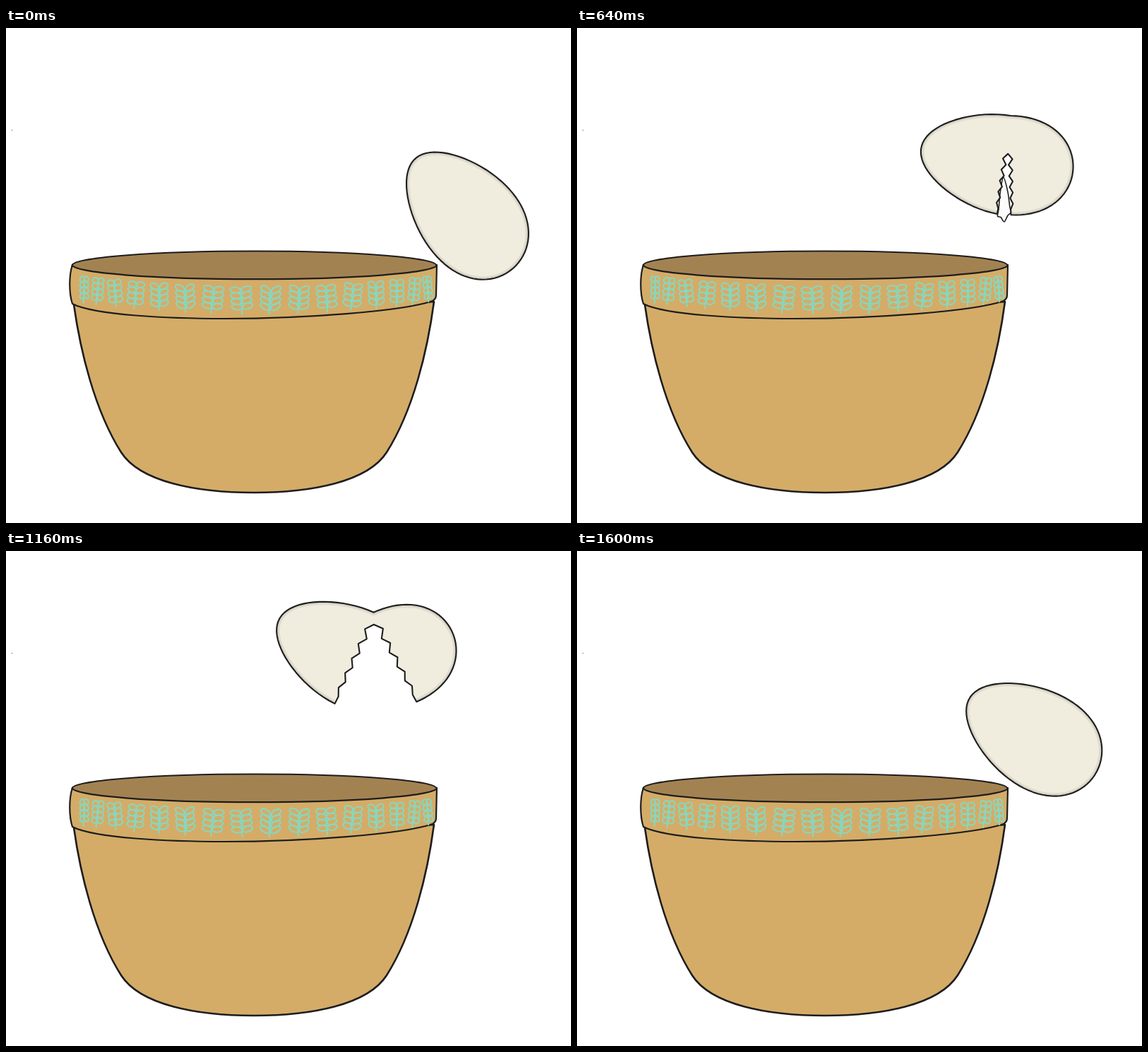
These frames come from a looping animation (800 px wide and 700 px high, 1.64 s). An HTML page with a canvas:

```html
<!DOCTYPE html>
<html lang="en">
<head>
<meta charset="utf-8">
<title>Cracking an egg into a bowl</title>
<style>
  html, body { margin: 0; height: 100%; overflow: hidden; background: #fff; }
  canvas { display: block; }
</style>
</head>
<body>
<canvas id="stage" width="800" height="700"></canvas>
<script>
const ctx = document.getElementById('stage').getContext('2d');
const LOOP = 1640, INK = '#1d1d1d', RAD = Math.PI / 180;

const clamp = v => Math.min(1, Math.max(0, v));
const lerp = (a, b, k) => a + (b - a) * k;
const mix = (a, b, k) => a.map((v, i) => lerp(v, b[i], k));

// Motion of the shell: time, hinge x and y, tilt and half opening in degrees.
const KEYS = [
  [0, 708, 223, 48, 0],
  [120, 733, 213, 55, 0],
  [360, 679, 212, 31, 0],
  [520, 654, 160, 20, 1.5],
  [640, 614, 124, 8, 4],
  [800, 535, 85, .5, 19],
  [960, 511, 67, 2, 25.5],
  [1040, 501, 82, 3, 28.3],
  [1120, 501, 82, 3, 28.3],
  [1280, 579, 101, 2.5, 12.5],
  [1600, 690, 207, 31, 0],
  [LOOP, 708, 223, 48, 0]
];

function poseAt(t) {
  const i = KEYS.findIndex(key => key[0] > t), a = KEYS[i - 1], b = KEYS[i];
  return mix(a, b, (t - a[0]) / (b[0] - a[0])).slice(1);
}

// The drawing is held for 80 ms at a time, 40 ms while the egg white sinks.
function heldTime(t) {
  if (t < 640) return Math.max(0, 40 + 80 * Math.floor((t - 40) / 80));
  const step = t >= 1040 && t < 1200 ? 40 : 80;
  return step * Math.floor(t / step);
}

function paint(path, fill, width) {
  if (fill) { ctx.fillStyle = fill; ctx.fill(path); }
  ctx.strokeStyle = INK;
  ctx.lineWidth = width;
  ctx.stroke(path);
}

// Egg outline by angle, blunt end to the right; halves meet at HINGE and LIP.
const eggPoint = u => [104 * Math.cos(u), 69 * Math.sin(u) * (1 + .18 * Math.cos(u))];
const HINGE = -1.47, LIP = 1.37, hingeAt = eggPoint(HINGE);

function eggArc(from, to, [x, y], degrees) {
  const c = Math.cos(degrees * RAD), s = Math.sin(degrees * RAD);
  return Array.from({ length: 41 }, (_, i) => {
    const p = eggPoint(lerp(from, to, i / 40)), dx = p[0] - hingeAt[0], dy = p[1] - hingeAt[1];
    return [x + dx * c - dy * s, y + dx * s + dy * c];
  });
}

// Broken edge from the crack tip to a lip, its teeth biting into the shell.
function zigzag(tip, lip, side, bite) {
  const dx = lip[0] - tip[0], dy = lip[1] - tip[1], len = Math.hypot(dx, dy), n = 11;
  return Array.from({ length: n + 1 }, (_, i) => {
    const k = i / n, off = i % 2 && i < n ? side * bite * (1 - k / 2) : 0;
    return [tip[0] + dx * k + dy / len * off, tip[1] + dy * k - dx / len * off];
  });
}

function drawShell(t) {
  const [x, y, tilt, spread] = poseAt(t);
  const left = eggArc(HINGE, LIP - 2 * Math.PI, [x, y], tilt + spread);
  const right = eggArc(LIP, HINGE, [x, y], tilt - spread);
  const shell = new Path2D(), edge = new Path2D();
  const line = (path, pts) => pts.forEach(p => path.lineTo(...p));

  line(shell, left);
  if (spread > 1) {
    const depth = 17 + 37 * Math.exp((4 - spread) / 4), bite = Math.min(9, 5 + .3 * spread);
    const lean = (tilt - 4) * RAD;
    const tip = [x - depth * Math.sin(lean), y + depth * Math.cos(lean)];
    line(shell, zigzag(tip, left[40], -1, bite).reverse());
    line(shell, zigzag(tip, right[0], 1, bite));
  }
  line(shell, right);
  shell.closePath();
  ctx.fillStyle = '#f0ecde';
  ctx.fill(shell);

  // Soft shade just inside the rim.
  line(edge, [...right, ...left]);
  ctx.save();
  ctx.clip(shell);
  ctx.strokeStyle = 'rgba(40, 35, 25, .07)';
  for (const width of [5, 9]) {
    ctx.lineWidth = width;
    ctx.stroke(edge);
  }
  ctx.restore();
  paint(shell, null, 2.1);
}

// Egg white hanging from the crack and dropping into the bowl, clockwise from the bottom.
const HANG = [[543, 271], [514, 253], [487, 248], [496, 220], [510, 150],
  [536, 92], [572, 150], [590, 214], [603, 231], [572, 246]];
const DROP = [[515, 400], [460, 360], [458, 315], [476, 262], [490, 244],
  [504, 257], [527, 230], [545, 266], [589, 303], [580, 355]];

function smoothLoop(pts) {
  const path = new Path2D(), n = pts.length;
  path.moveTo(...pts[0]);
  pts.forEach((b, i) => {
    const a = pts[(i + n - 1) % n], c = pts[(i + 1) % n], d = pts[(i + 2) % n];
    path.bezierCurveTo(b[0] + (c[0] - a[0]) / 6, b[1] + (c[1] - a[1]) / 6,
      c[0] - (d[0] - b[0]) / 6, c[1] - (d[1] - b[1]) / 6, ...c);
  });
  return path;
}

function drawWhite(t) {
  const form = clamp((t - 640) / 160), fall = clamp((t - 800) / 240);
  const sink = Math.max(0, t - 1040) * 1.08;
  const place = ([x, y]) => [
    lerp(605, 543, form) + (x - 543) * lerp(.17, 1, form),
    lerp(274, 271, form) + (y - 271) * lerp(.35, 1, form) + sink
  ];
  paint(smoothLoop(HANG.map((p, i) => place(mix(p, DROP[i], fall)))), '#fcfcfa', 1.6);
  if (form === 0) return;
  const yolk = new Path2D();
  yolk.arc(...place(mix([543, 214], [515, 343], fall)), lerp(21.5, 31, fall) * form, 0, 7);
  paint(yolk, '#fdcd66', 2.3);
}

const mouth = new Path2D();
mouth.ellipse(351.5, 335.7, 258, 20.2, 0, 0, 7);
const band = new Path2D('M94 335C89 350 89 375 94 390C125 406 230 411 310 411C420 411 560 401 604 386' +
  'Q609 383 609 378L610 335A258 20.2 0 0 1 94 335Z');
const body = new Path2D('M96 391C105 455 125 540 163 600C190 642 270 657 351 657' +
  'C432 657 512 642 539 600C577 540 597 455 606 387L350 405Z');

// Leaf sprigs spaced as if printed around the curved band.
function sprig(i) {
  const turn = (i - 7.5) * .155, w = 30 * Math.cos(turn) / 4;
  const splay = .35 + .25 * Math.sin(i * 1.7);
  ctx.save();
  ctx.translate(354 + 265 * Math.sin(turn), 383 - 18 * Math.sin(turn) ** 2);
  ctx.rotate(.1 * Math.sin(i * 2.4));
  ctx.beginPath();
  ctx.moveTo(0, -8);
  ctx.lineTo(-1, 21);
  for (let y = -13; y <= 11; y += 8) {
    for (const side of [-1, 1]) {
      const tilt = -side * splay;
      ctx.moveTo(side * w + w * Math.cos(tilt), y + w * Math.sin(tilt));
      ctx.ellipse(side * w, y, w, 4, tilt, 0, 7);
    }
  }
  ctx.stroke();
  ctx.restore();
}

function drawBowlFront() {
  paint(body, '#d4ac68', 2.6);
  paint(band, '#d4ac68', 2.2);
  ctx.save();
  ctx.clip(band);
  ctx.strokeStyle = '#86d8c0';
  ctx.lineWidth = 2;
  for (let i = 0; i < 16; i++) sprig(i);
  ctx.restore();
}

const impact = new Path2D('M570 312L579 314.5M573 328.5L583 323.5M592 329Q593 336 590 342');

function draw(t) {
  ctx.clearRect(0, 0, 800, 700);
  ctx.lineJoin = ctx.lineCap = 'round';
  ctx.fillStyle = '#444';
  ctx.fillRect(8, 144, 1, 1);
  paint(mouth, '#a38252', 2);
  if (t >= 640 && t < 1160) drawWhite(t);
  drawBowlFront();
  drawShell(t);
  if (t >= 360 && t < 440) paint(impact, null, 1.3);
}

function tick() {
  draw(heldTime(performance.now() % LOOP));
  requestAnimationFrame(tick);
}
tick();
</script>
</body>
</html>
```
